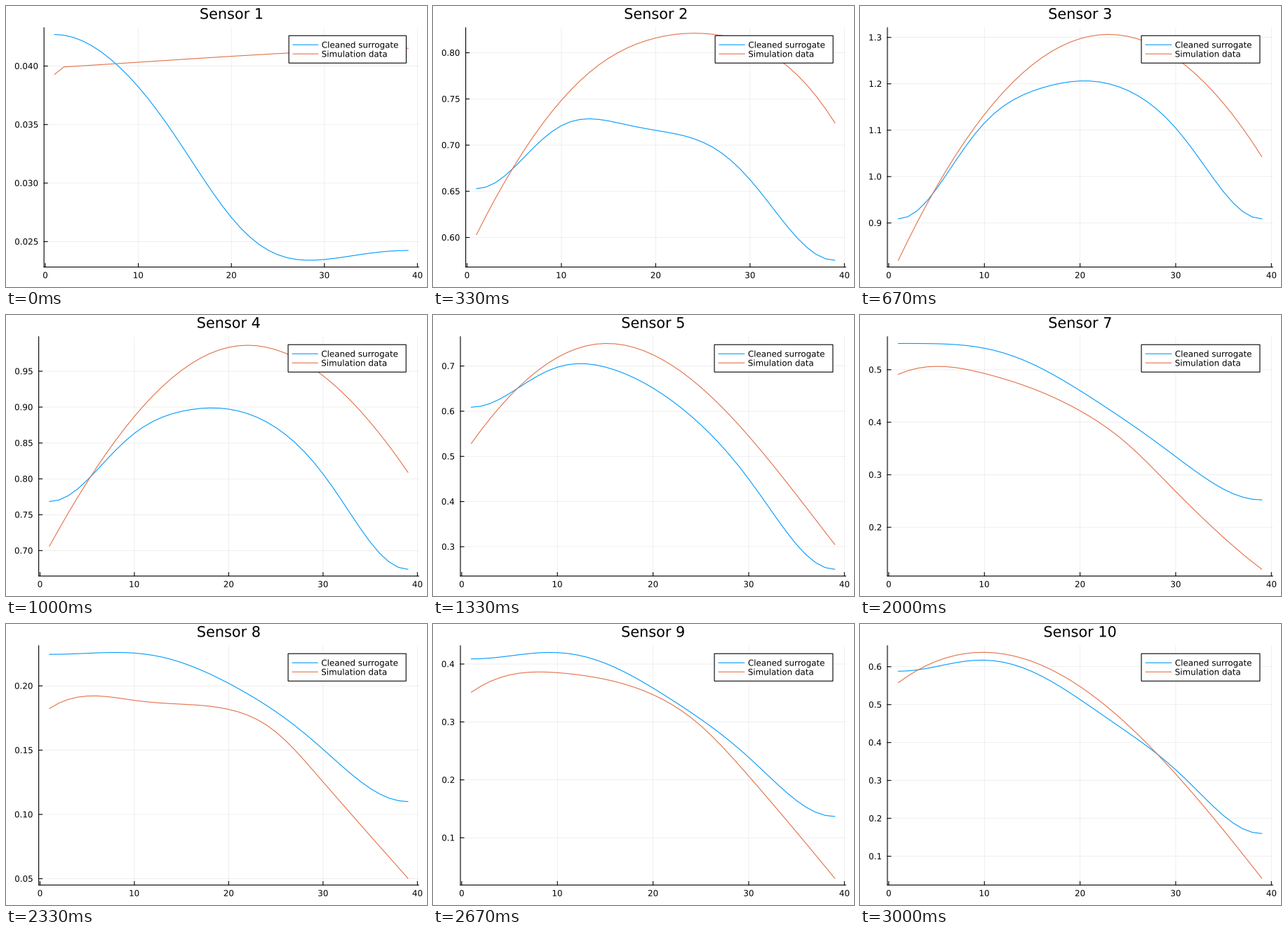
Recreate the animation shown at these times as a matplotlib script. Size 600 px wide and 400 px high, loop 3.33 s.

```python
import matplotlib.pyplot as plt
import numpy as np
from matplotlib.animation import FuncAnimation
from matplotlib.patches import PathPatch, Rectangle
from matplotlib.path import Path
from matplotlib.textpath import TextPath

W, H, DPI = 600, 400, 100
PX = 72 / DPI                       # points per pixel
TOP, BOTTOM, RIGHT = 30.9, 371.6, 588.2
PEAK, BASE = 40.5, 362.0            # rows of the largest and smallest value
BLUE, ORANGE = "#009afa", "#e36f47"
X = np.arange(1, 40)
STEP, LOOP = 30, 3330               # ms


def cosines(t, n):
    """Cosine series, level at both ends."""
    return np.cos(np.pi * np.outer(t, np.arange(n)))


def cubics(t, n):
    """Cubic spline with not-a-knot ends."""
    t, knots = t[:, None], np.linspace(0, 1, n)[2:-2]
    return np.hstack([t ** np.arange(4), np.maximum(t - knots, 0) ** 3])


def through(basis, rows):
    """Smooth curve through evenly spaced key rows."""
    n = len(rows)
    weights = np.linalg.solve(basis(np.linspace(0, 1, n), n), rows)
    return basis((X - 1) / 38, n) @ weights


def sensor(lo, hi, step, surrogate, simulation):
    return lo, hi, step, np.array([through(cosines, surrogate),
                                   through(cubics, simulation)])


def between(lo, hi, step, a, b):
    """Mean shape of two sensors, stretched to the full plot height."""
    mix = (a[3] + b[3]) / 2
    mix = PEAK + (mix - mix.min()) * (BASE - PEAK) / np.ptp(mix)
    return lo, hi, step, mix


s1 = sensor(0.0234, 0.0427, 0.005,
            [40.5, 79.3, 179.3, 301, 359.3, 356.2, 348], [87.5, 76.9, 66.8, 60.2])
s1[3][1, 0] += 9.8                  # the simulation starts with a jump
s2 = sensor(0.5753, 0.8198, 0.05,
            [260, 198, 161, 177, 203.4, 292, 362],
            [325.5, 180, 87, 45.5, 40.7, 72.5, 166.5])
s3 = sensor(0.8195, 1.3064, 0.1,
            [303, 213.5, 129, 106.7, 130, 221, 303], [362, 146, 46.5, 69.5, 214.5])
s4 = sensor(0.6739, 0.9887, 0.05,
            [265.5, 202, 142, 134, 173.5, 278, 362], [329, 136.5, 46, 81.3, 224])
s6 = sensor(-0.2387, 0.5162, 0.2,
            [40.5, 47, 76.8, 133, 194, 247.5, 274.5],
            [50.8, 49.8, 85, 153, 233, 309, 362])
s8 = sensor(0.0503, 0.226, 0.05,
            [43.2, 40.6, 49.5, 84.5, 137.7, 210, 252.8],
            [120.3, 102.3, 109.6, 114.3, 121.5, 151, 217, 290, 362])
s10 = sensor(0.0418, 0.6376, 0.1,
             [67.3, 54.3, 60.6, 107.5, 167.3, 242.7, 298.3], [83.5, 40.5, 89, 206, 362])
s5 = between(0.25, 0.75, 0.1, s4, s6)
s7 = between(0.12, 0.55, 0.1, s6, s8)
s9 = between(0.03, 0.42, 0.1, s8, s10)
SENSORS = [s1, s2, s3, s4, s5, s6, s7, s8, s9, s10]

fig = plt.figure(figsize=(W / DPI, H / DPI), dpi=DPI, facecolor="white")


def line(ax, x, y, color="black", width=1.1, **kw):
    ax.plot(x, y, color=color, lw=width * PX, snap=False, **kw)


def label(ax, x, y, text, size=11.9, align=0.5):
    """Text outline; align 0, 0.5 or 1 puts its left, middle or right at x."""
    glyphs = TextPath((0, 0), text, size=size, prop={"family": "DejaVu Sans"})
    box = glyphs.get_extents()
    shift = x - box.x0 - align * box.width
    outline = Path(glyphs.vertices * [1, -1] + [shift, y], glyphs.codes)
    ax.add_patch(PathPatch(outline, fc="black", lw=0, snap=False, zorder=6))


def grid(ax, x, y):
    line(ax, x, y, width=0.6, alpha=0.1, zorder=1)


def legend(ax, width):
    right = RIGHT - width / 30
    left = right - 110.4 - 0.1065 * width
    ax.add_patch(Rectangle((left, 42.2), right - left, 39, fc="white", ec="black",
                           lw=1.1 * PX, snap=False, zorder=4))
    x0 = left + width / 90
    x1 = x0 + width / 15
    for y, color, name in ((55.2, BLUE, "Cleaned surrogate"),
                           (68.2, ORANGE, "Simulation data")):
        line(ax, [x0, x1], [y, y], color, zorder=5)
        label(ax, x1 + 5.8, y + 4.3, name, align=0)


def chart(number, lo, hi, step, curves):
    ax = fig.add_axes([0, 0, 1, 1], label=str(number))
    ax.set(xlim=(0, W), ylim=(H, 0))
    ax.axis("off")

    decimals = 3 if step < 0.01 else 2 if step < 0.1 else 1
    left = 31.45 + 7.57 * decimals + (9.2 if lo < 0 else 0)
    width = RIGHT - left

    def px(v):
        return left + (v + 0.14) / 40.28 * width

    for v in range(0, 41, 10):
        x = px(v)
        grid(ax, [x, x], [TOP, BOTTOM])
        line(ax, [x, x], [BOTTOM, BOTTOM - 5], zorder=3)
        label(ax, x, 387.4, str(v))

    pad = 0.03 * (hi - lo)
    first, last = np.ceil((lo - pad) / step), np.floor((hi + pad) / step)
    for n in np.arange(first, last + 1):
        v = n * step
        y = BASE - (v - lo) / (hi - lo) * (BASE - PEAK)
        grid(ax, [left, RIGHT], [y, y])
        line(ax, [left, left + 5], [y, y], zorder=3)
        sign = "\u2212" if n < 0 else ""
        label(ax, left - 8.9, y + 4.3, f"{sign}{abs(v):.{decimals}f}", align=1)

    for rows, color in zip(curves, (BLUE, ORANGE)):
        line(ax, px(X), rows, color, zorder=2)
    line(ax, [left, left], [TOP, BOTTOM], zorder=3)
    line(ax, [left, RIGHT], [BOTTOM, BOTTOM], zorder=3)
    legend(ax, width)
    label(ax, (left + RIGHT) / 2, 18.3, f"Sensor {number}", 20.8)
    return ax


charts = [chart(i, *s) for i, s in enumerate(SENSORS, 1)]


def draw(i):
    shown = ((i + 1) * STEP - 1) * len(charts) // LOOP
    for k, ax in enumerate(charts):
        ax.set_visible(k == shown)
    return []


anim = FuncAnimation(fig, draw, frames=LOOP // STEP, init_func=lambda: draw(0),
                     interval=STEP, repeat=True, repeat_delay=0)
plt.show()
```
